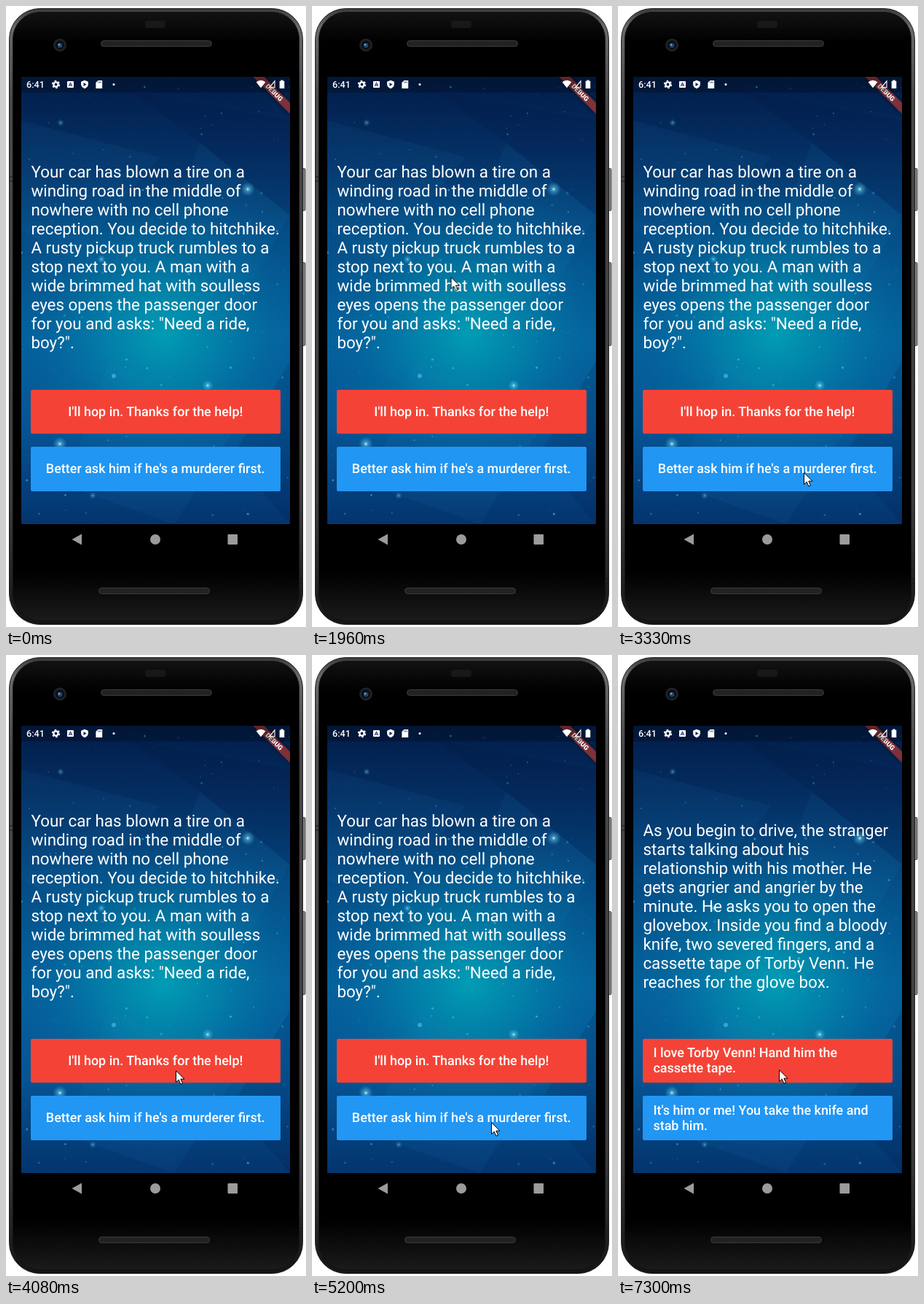
Recreate the animation shown at these times as an HTML page with a canvas. Size 412 px wide and 851 px high, loop 8 s.

```html
<!DOCTYPE html>
<html lang="en">
<head>
<meta charset="utf-8">
<title>Hitchhike story</title>
<style>
  html, body { margin: 0; width: 100%; height: 100%; overflow: hidden; background: #fff; }
  #stage { position: relative; width: 412px; height: 851px; overflow: hidden;
    font-family: Roboto, sans-serif; color: #fff; text-rendering: geometricPrecision; }
  #stage > * { position: absolute; }
  svg, canvas { display: block; }
  .layer { left: 0; top: 0; }
  #sky { left: 21px; top: 97px; }

  .story { left: 34.4px; font-size: 22.42px; line-height: 26.04px; white-space: pre; }
  .button { left: 34px; width: 342.5px; border-radius: 2px; overflow: hidden; }
  .red { top: 526px; height: 60px; background: #f44336; }
  .blue { top: 604px; height: 61px; background: #2196f3; }
  .label { position: absolute; inset: 2px 0 0; display: flex; align-items: center; justify-content: center;
    font-weight: 500; font-size: 17.94px; line-height: 20.6px; white-space: pre; }
  .label.wrap { justify-content: flex-start; padding-left: 14.4px; }

  .first, .second, .ink, .splash, #cursor { animation: 8s linear infinite; }
  .first { animation-name: leave; }
  .second { animation-name: arrive; }
  @keyframes leave { 0%, 88.6% { visibility: visible; } 88.61%, 100% { visibility: hidden; } }
  @keyframes arrive { 0%, 88.6% { visibility: hidden; } 88.61%, 100% { visibility: visible; } }

  .ink { position: absolute; inset: 0; background: #bcbcbc; opacity: 0; animation-name: ink; }
  .splash { position: absolute; left: -13px; top: -158px; width: 400px; height: 400px;
    border-radius: 50%; background: #c8c8c8; opacity: 0; animation-name: splash; }
  @keyframes ink { 0%, 86% { opacity: 0; } 88.6% { opacity: .34; } 91.25%, 100% { opacity: 0; } }
  @keyframes splash {
    0%, 86% { opacity: 0; transform: scale(.08); }
    87% { opacity: .3; transform: scale(.14); }
    88.6% { opacity: .35; transform: scale(.3); }
    91.25%, 100% { opacity: 0; transform: scale(1); }
  }

  #cursor { left: 0; top: 0; animation-name: roam; }
  @keyframes roam {
    0%, 5.12% { transform: translate(319px, 860px); }
    5.125% { transform: translate(319px, 840px); }
    8.5% { transform: translate(286px, 722px); }
    12.25%, 12.5% { transform: translate(238px, 569px); }
    15%, 15.1% { transform: translate(198px, 425px); animation-timing-function: ease-out; }
    17.75%, 23% { transform: translate(183px, 357px); animation-timing-function: ease-in; }
    27.5% { transform: translate(230px, 445px); }
    29.5% { transform: translate(237px, 490px); animation-timing-function: ease-out; }
    33.25%, 33.4% { transform: translate(217px, 540px); }
    34.25%, 37.2% { transform: translate(214px, 552px); animation-timing-function: ease-in-out; }
    41.625%, 44.2% { transform: translate(255px, 639px); animation-timing-function: ease-in-out; }
    47.875%, 50.7% { transform: translate(225px, 563px); }
    51%, 51.25% { transform: translate(233px, 569px); animation-timing-function: ease-out; }
    54.125%, 56.4% { transform: translate(251px, 634px); animation-timing-function: ease-in; }
    58.2% { transform: translate(258px, 598px); animation-timing-function: ease-out; }
    60.125%, 62.1% { transform: translate(229px, 558px); animation-timing-function: ease-in; }
    63.7% { transform: translate(258px, 606px); animation-timing-function: ease-out; }
    65%, 71.1% { transform: translate(246px, 640px); animation-timing-function: ease-in-out; }
    77.625%, 100% { transform: translate(221px, 568px); }
  }
</style>
</head>
<body>
<div id="stage">
  <svg class="layer" width="412" height="851">
    <defs>
      <linearGradient id="rim" x2="0" y2="1">
        <stop stop-color="#3a3a3c"/><stop offset=".03" stop-color="#6a6a6c"/>
        <stop offset=".15" stop-color="#48484a"/><stop offset=".8" stop-color="#3c3c3e"/>
        <stop offset="1" stop-color="#141415"/>
      </linearGradient>
      <linearGradient id="glass" x2="0" y2="1">
        <stop stop-color="#121213"/><stop offset=".05" stop-color="#000"/>
        <stop offset=".92" stop-color="#000"/><stop offset="1" stop-color="#1b1b1c"/>
      </linearGradient>
      <pattern id="mesh" width="3" height="3" patternUnits="userSpaceOnUse">
        <rect width="3" height="3" fill="#1c1c1c"/><path d="M0 3L3 0" stroke="#363636" stroke-width=".7"/>
      </pattern>
    </defs>
    <g fill="#808082" stroke="#4a4a4c">
      <rect x="404.5" y="222.5" width="6.5" height="58" rx="1.5"/>
      <rect x="404.5" y="351.5" width="6.5" height="114" rx="1.5"/>
    </g>
    <rect x="4.5" y="3.5" width="403" height="844" rx="42" fill="url(#rim)" stroke="#1c1c1e"/>
    <rect x="9.5" y="8.5" width="393" height="834" rx="37" fill="url(#glass)" stroke="#111"/>
    <path d="M4 234h5M4 240h5M403 785h5M403 791h5" stroke="#19191a"/>
    <rect x="191" y="20" width="28" height="10" rx="4" fill="#18181a"/>
    <g fill="url(#mesh)" stroke="#3a3a3a">
      <rect x="130.5" y="47.5" width="152" height="8" rx="4"/>
      <rect x="127.5" y="797.5" width="152" height="8" rx="4"/>
    </g>
    <circle cx="74" cy="53.5" r="9" fill="#202125"/>
    <circle cx="74" cy="53.5" r="6" fill="#0a0e16"/>
    <circle cx="74" cy="54" r="3.3" fill="#22466f"/>
    <circle cx="73" cy="53" r="1.2" fill="#7fa9cd"/>
    <g fill="#9b9b9b">
      <path d="M90.5 731L104 723.5V738.5Z"/>
      <circle cx="205" cy="731" r="7"/>
      <rect x="304.5" y="724" width="13.5" height="14" rx="1"/>
    </g>
  </svg>

  <canvas id="sky" width="369" height="613"></canvas>

  <svg class="layer" width="412" height="851">
    <defs><clipPath id="screen"><rect x="21" y="97" width="369" height="613"/></clipPath></defs>
    <g clip-path="url(#screen)">
      <g transform="translate(390 97) rotate(45)">
        <rect x="-36" y="25.1" width="72" height="10.8" fill="#7f3038"
          style="filter: drop-shadow(0 0 3px rgba(0, 0, 0, .5))"/>
        <text y="33.7" text-anchor="middle" font-size="9.15" font-weight="900" fill="#fff">DEBUG</text>
      </g>
    </g>
    <rect x="21" y="97" width="369" height="21.5" fill="#000" fill-opacity=".25"/>
    <g fill="#fff">
      <text x="28" y="112.3" font-size="12.6" font-weight="500">6:41</text>
      <circle cx="68.5" cy="107.5" r="3.1" fill="none" stroke="#fff" stroke-width="2.4"/>
      <circle cx="68.5" cy="107.5" r="4.9" fill="none" stroke="#fff" stroke-width="1.6" stroke-dasharray="2.6 2.53"/>
      <rect x="84" y="103" width="9" height="9" rx="1"/>
      <path d="M86.3 110L88.5 104.8L90.7 110M87.2 108.4h2.6" fill="none" stroke="#07204c" stroke-width="1"/>
      <path d="M108 101.8l4.9 2v3.5q0 4-4.9 5.9q-4.9-1.9-4.9-5.9v-3.5z"/>
      <path d="M106.5 105l4 2.5l-4 2.5z" fill="#07204c"/>
      <path d="M126.5 102h5.7v11h-8.8v-8z"/>
      <path d="M126.7 103.5v2M128.5 103.5v2M130.3 103.5v2" stroke="#07204c" stroke-width=".8"/>
      <circle cx="148" cy="107.5" r="1.5"/>
      <path d="M343.6 104.3q6.4-5 12.8 0L350 112.3z"/>
      <path d="M361.8 111.8H369V102.8Z" fill="none" stroke="#fff" stroke-width="1.1"/>
      <path d="M377.5 101.5h3v1.2h1.8v10.3h-6.6v-10.3h1.8z"/>
    </g>
  </svg>

  <div class="story first" style="top: 215px">Your car has blown a tire on a
winding road in the middle of
nowhere with no cell phone
reception. You decide to hitchhike.
A rusty pickup truck rumbles to a
stop next to you. A man with a
wide brimmed hat with soulless
eyes opens the passenger door
for you and asks: "Need a ride,
boy?".</div>
  <div class="story second" style="top: 228px">As you begin to drive, the stranger
starts talking about his
relationship with his mother. He
gets angrier and angrier by the
minute. He asks you to open the
glovebox. Inside you find a bloody
knife, two severed fingers, and a
cassette tape of Torby Venn. He
reaches for the glove box.</div>

  <div class="button red">
    <div class="ink"></div><div class="splash"></div>
    <div class="label first">I'll hop in. Thanks for the help!</div>
    <div class="label wrap second">I love Torby Venn! Hand him the
cassette tape.</div>
  </div>
  <div class="button blue">
    <div class="label first">Better ask him if he's a murderer first.</div>
    <div class="label wrap second">It's him or me! You take the knife and
stab him.</div>
  </div>

  <svg id="cursor" width="14" height="21">
    <path d="M.5 .8V16.6L4.2 13.1L6.9 19.2L9.5 18.1L6.9 12.1H12Z" fill="#fff" stroke="#000"/>
  </svg>
</div>
<script>
  const ctx = document.getElementById('sky').getContext('2d');
  const W = 369, H = 613;
  let seed = 41;
  const random = () => (seed = seed * 16807 % 2147483647) / 2147483647;

  function fill(gradient, stops) {
    stops.forEach(([at, color]) => gradient.addColorStop(at, color));
    ctx.fillStyle = gradient;
    ctx.fillRect(0, 0, W, H);
  }

  function facet(color, ...points) {
    ctx.beginPath();
    points.forEach(([x, y]) => ctx.lineTo(x, y));
    ctx.fillStyle = color;
    ctx.fill();
  }

  function dot(x, y, r, alpha) {
    ctx.fillStyle = `rgba(85,195,225,${alpha})`;
    ctx.beginPath();
    ctx.arc(x, y, r, 0, 7);
    ctx.fill();
  }

  function glow(x, y, r, alpha) {
    const g = ctx.createRadialGradient(x, y, 0, x, y, r);
    g.addColorStop(0, `rgba(215,250,255,${alpha})`);
    g.addColorStop(.25, `rgba(120,220,245,${alpha * .5})`);
    g.addColorStop(1, 'rgba(60,180,230,0)');
    ctx.fillStyle = g;
    ctx.fillRect(x - r, y - r, 2 * r, 2 * r);
  }

  fill(ctx.createLinearGradient(0, 0, 0, H), [
    [0, '#021d49'], [.15, '#042d61'], [.35, '#054c85'],
    [.58, '#06609c'], [.78, '#065495'], [1, '#04346d']
  ]);
  fill(ctx.createRadialGradient(195, 352, 0, 195, 352, 235), [
    [0, 'rgba(0,172,186,.8)'], [.35, 'rgba(0,150,178,.55)'],
    [.7, 'rgba(0,118,165,.22)'], [1, 'rgba(0,90,150,0)']
  ]);

  const light = 'rgba(40,140,200,.07)', dark = 'rgba(0,10,50,.12)';
  facet(light, [0, 60], [190, 110], [70, 250], [0, 210]);
  facet(dark, [150, 20], [369, 60], [369, 190], [245, 90]);
  facet(light, [245, 90], [369, 190], [300, 310], [205, 200]);
  facet(light, [120, 390], [300, 470], [210, 613], [60, 560]);
  facet(dark, [369, 390], [290, 520], [369, 613]);

  for (let i = 0; i < 200; i++) {
    dot(random() * W, random() * H, .4 + random() ** 3 * 1.5, .15 + random() * .5);
  }

  glow(311, 154, 10, 1);
  glow(256, 423, 8, 1);
  glow(53, 503, 10, 1);
  glow(110, 250, 6, .8);
  glow(54, 63, 5, .6);
  glow(98, 574, 5, .6);
  dot(127, 410, 3, .6);
</script>
</body>
</html>
```
